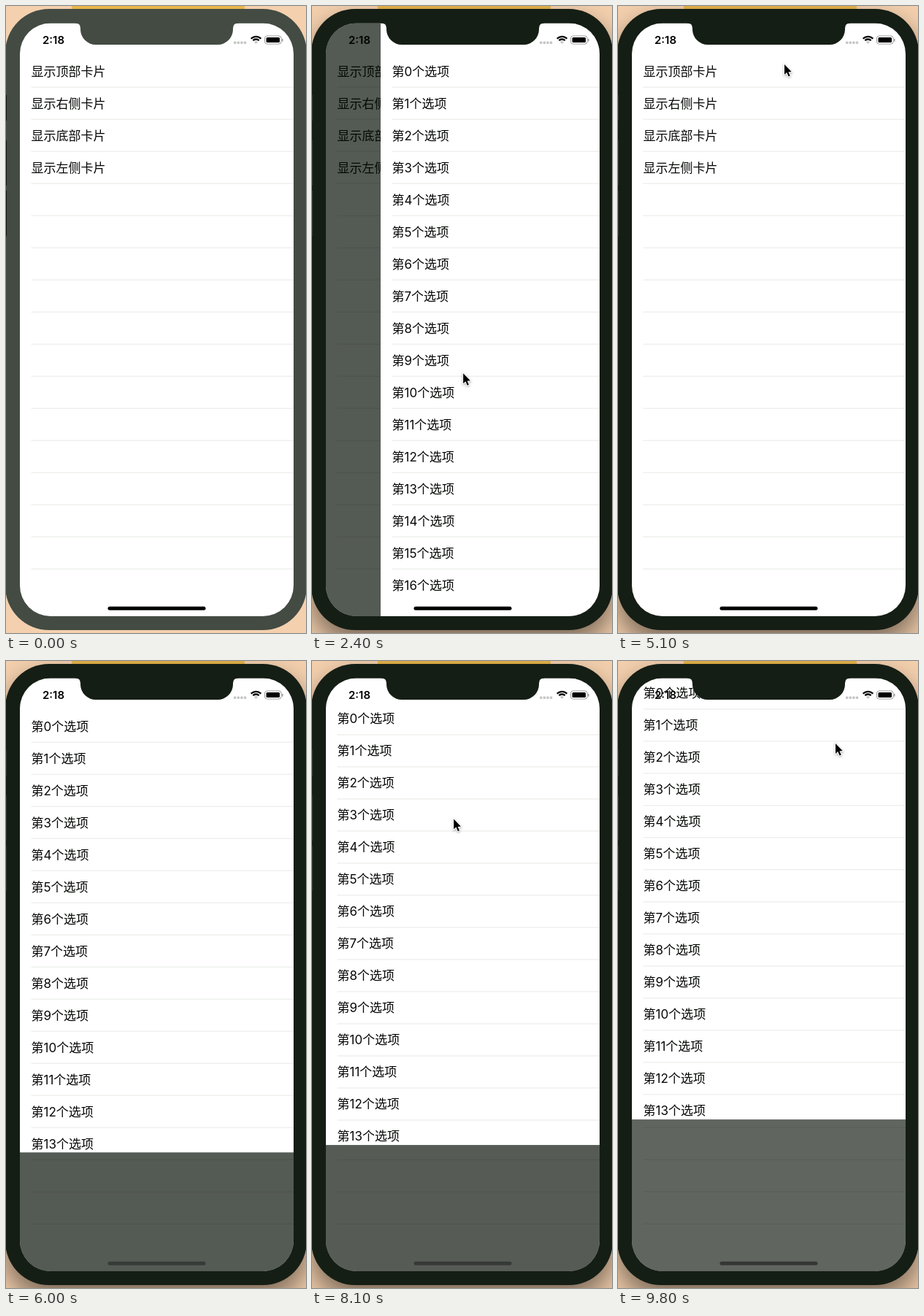
These frames come from a looping animation (411x859 px, 9900 ms). An HTML page with a canvas:

```html
<!DOCTYPE html>
<html lang="zh-CN">
<head>
<meta charset="utf-8">
<style>
html, body { margin: 0; width: 100%; height: 100%; overflow: hidden; }
canvas { display: block; }
</style>
</head>
<body>
<canvas id="stage" width="411" height="859"></canvas>
<script>
const ctx = document.getElementById('stage').getContext('2d');
const LOOP = 9900, STEP = 100;
const SCREEN = { x: 19, y: 23.5, w: 375, h: 812.5 };
const RIGHT = SCREEN.x + SCREEN.w;
const SIDE_WIDTH = SCREEN.w * 0.8, TOP_HEIGHT = SCREEN.h * 0.8;
const OPEN_TIME = 500, MOVE_TIME = 500;
const ROW = 44, FIRST_ROW = 67, INSET = 15.5;
const FONT = 'Inter, "Noto Sans CJK SC", "Noto Sans CJK", "Noto Sans", sans-serif';
const MENU = [...'顶右底左'].map((side, i) => `显示${side}${i % 2 ? '侧' : '部'}卡片`);
const OPTIONS = Array.from({ length: 17 }, (_, i) => `第${i}个选项`);

// Pointer stops: arrival time and tip position
const STOPS = [
  { t: 100, x: 330, y: 420 },
  { t: 1000, x: 215, y: 134 },
  { t: 1600, x: 217, y: 511 },
  { t: 2800, x: 114, y: 430 },
  { t: 3500, x: 304, y: 418 },
  { t: 4500, x: 228, y: 80 },
  { t: 6500, x: 201, y: 740 },
  { t: 7300, x: 206, y: 67 },
  { t: 8400, x: 172, y: 500 },
  { t: 8900, x: 172, y: 466 },
  { t: 9380, x: 298, y: 113 }
];

const ease = p => (1 - Math.cos(Math.PI * Math.min(1, Math.max(0, p)))) / 2;

// 0 = hidden, 1 = open; opens after a tap, then is dragged shut
function openness(t, openAt, closeAt, closeTime) {
  return ease((t - openAt) / OPEN_TIME) * (1 - ease((t - closeAt) / closeTime));
}

const sideCard = t => SIDE_WIDTH * openness(t, 1357, 3080, 718);
const topCard = t => TOP_HEIGHT * (
  openness(t, 5490, 6760, 540) +
  openness(t, 7640, 8820, 540) +
  openness(t, 9385, LOOP, 1));

function pointerAt(t) {
  const next = STOPS.findIndex(stop => stop.t > t);
  if (next < 0) return STOPS[STOPS.length - 1];
  const from = STOPS[next - 1], to = STOPS[next];
  const time = Math.min(MOVE_TIME, to.t - from.t);
  const p = ease(1 - (to.t - t) / time);
  return { x: from.x + (to.x - from.x) * p, y: from.y + (to.y - from.y) * p };
}

function roundBox(x, y, w, h, r, color) {
  ctx.fillStyle = color;
  ctx.beginPath();
  ctx.roundRect(x, y, w, h, r);
  ctx.fill();
}

function fillBox(x, y, w, h, color) {
  ctx.fillStyle = color;
  ctx.fillRect(x, y, w, h);
}

function drawRows(labels, x, offset) {
  const left = x + INSET;
  for (let i = 1; i <= 16; i++) {
    fillBox(left, FIRST_ROW + i * ROW + offset - 0.3, RIGHT - left, 1, '#e6eae4');
  }
  ctx.font = `400 17px ${FONT}`;
  ctx.fillStyle = '#050805';
  ctx.textAlign = 'left';
  labels.forEach((label, i) => ctx.fillText(label, left, FIRST_ROW + i * ROW + 28.7 + offset));
}

function drawPhone(body, active) {
  fillBox(0, 0, 411, 859, '#f4d0ae');
  roundBox(90, -6, 237, 14, 4, '#e9b54b');
  ctx.save();
  if (active) {
    ctx.shadowColor = 'rgba(0,0,0,.5)';
    ctx.shadowBlur = 36;
    ctx.shadowOffsetY = 18;
  }
  roundBox(-1, 4, 413, 851, 60, body);
  ctx.restore();
  for (const [y, h] of [[122, 35], [184, 62], [253, 62]]) {
    fillBox(0, y, 1, h, active ? '#2b332b' : '#101510');
  }
}

function drawCard(x, y, w, h, rowOffset) {
  ctx.save();
  ctx.beginPath();
  ctx.rect(x, y, w, h);
  ctx.clip();
  fillBox(x, y, w, h, '#fff');
  drawRows(OPTIONS, x, rowOffset);
  ctx.restore();
}

function drawStatus() {
  ctx.fillStyle = '#000';
  ctx.font = '600 15px Inter, sans-serif';
  ctx.textAlign = 'center';
  ctx.fillText('2:18', 65, 51.7);
  for (let i = 0; i < 4; i++) roundBox(312 + i * 4.6, 48.5, 3.4, 3.4, 1, '#c4c7c4');

  // Wi-Fi: two arcs and a wedge
  ctx.strokeStyle = '#000';
  ctx.lineWidth = 2.3;
  const from = -Math.PI * 0.76, to = -Math.PI * 0.24;
  for (const r of [9.3, 5.7]) {
    ctx.beginPath();
    ctx.arc(342.5, 51.2, r, from, to);
    ctx.stroke();
  }
  ctx.beginPath();
  ctx.moveTo(342.5, 52);
  ctx.arc(342.5, 51.5, 3.4, from, to);
  ctx.fill();

  ctx.strokeStyle = '#999c99';
  ctx.lineWidth = 1;
  ctx.beginPath();
  ctx.roundRect(354.5, 41, 22.5, 11, 3);
  ctx.stroke();
  roundBox(356.5, 43, 18.5, 7, 1.5, '#000');
  roundBox(378, 44.7, 1.5, 4, 1, '#999c99');
}

function drawNotch(color) {
  const left = 102, right = 311, top = 23.5, bottom = 53, flare = 7;
  ctx.fillStyle = color;
  ctx.beginPath();
  ctx.moveTo(left - flare, top - 1.5);
  ctx.lineTo(left - flare, top);
  ctx.quadraticCurveTo(left, top, left, top + flare);
  ctx.arcTo(left, bottom, right, bottom, 21);
  ctx.arcTo(right, bottom, right, top, 21);
  ctx.lineTo(right, top + flare);
  ctx.quadraticCurveTo(right, top, right + flare, top);
  ctx.lineTo(right + flare, top - 1.5);
  ctx.fill();
}

function drawPointer({ x, y }) {
  const arrow = new Path2D('M0 0V14L3.2 11L5.6 16.6L7.8 15.6L5.4 10.4L9.7 10.1Z');
  ctx.save();
  ctx.translate(x, y);
  ctx.shadowColor = 'rgba(0,0,0,.35)';
  ctx.shadowBlur = 3;
  ctx.shadowOffsetY = 1;
  ctx.strokeStyle = '#fff';
  ctx.lineWidth = 2;
  ctx.stroke(arrow);
  ctx.shadowColor = 'transparent';
  ctx.fillStyle = '#000';
  ctx.fill(arrow);
  ctx.restore();
}

function render(t) {
  const active = t >= 600;
  const body = active ? '#151e15' : '#434b43';
  const side = sideCard(t), top = topCard(t);
  drawPhone(body, active);

  ctx.save();
  ctx.beginPath();
  ctx.roundRect(SCREEN.x, SCREEN.y, SCREEN.w, SCREEN.h, 42);
  ctx.clip();
  fillBox(SCREEN.x, SCREEN.y, SCREEN.w, SCREEN.h, '#fff');
  drawRows(MENU, SCREEN.x, 0);

  // The backdrop darkens with the share of the screen that a card covers
  const dim = 0.84 * Math.max(side / SCREEN.w, top / SCREEN.h);
  fillBox(SCREEN.x, SCREEN.y, SCREEN.w, SCREEN.h, `rgba(0,9,0,${dim})`);
  if (side > 0) drawCard(RIGHT - side, SCREEN.y, side, SCREEN.h, 0);
  if (top > 0) drawCard(SCREEN.x, SCREEN.y, SCREEN.w, top, top - TOP_HEIGHT);

  const tone = Math.round(56 * top / TOP_HEIGHT);
  roundBox(139.5, 822.8, 134, 5, 2.5, `rgb(${tone},${tone + 2},${tone})`);
  drawStatus();
  ctx.restore();

  drawNotch(body);
  const pointerHidden = t < 100 || (t >= 5700 && t < 6400);
  if (!pointerHidden) drawPointer(pointerAt(t));
}

function tick(now) {
  const t = now % LOOP;
  render(t - t % STEP);
  requestAnimationFrame(tick);
}
render(0);
requestAnimationFrame(tick);
</script>
</body>
</html>
```
